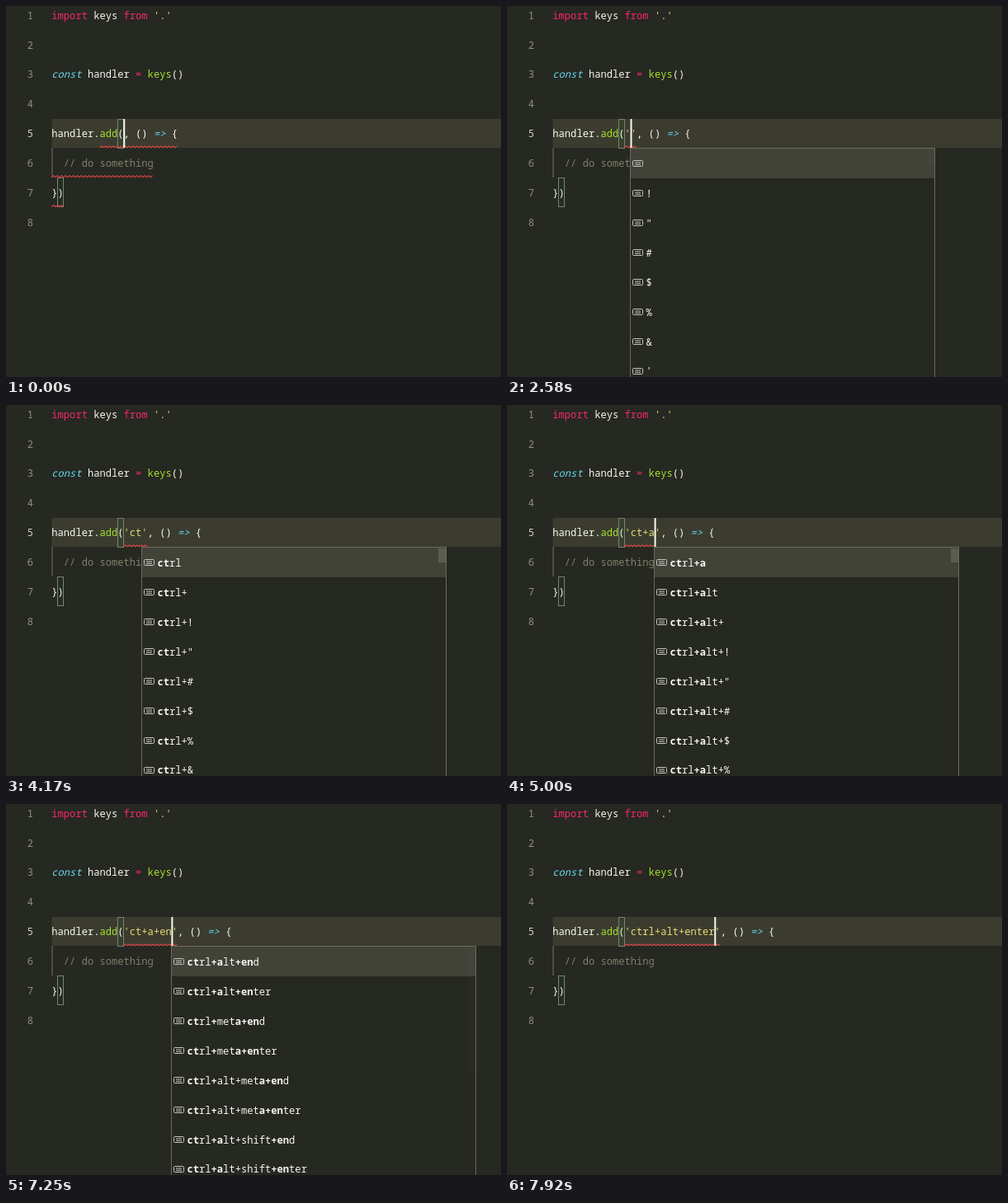
Recreate the animation shown at these times as an HTML page with a canvas. Size 600 px wide and 450 px high, loop 8000 ms.

```html
<!DOCTYPE html>
<html lang="en">
<head>
<meta charset="utf-8">
<title>Key completion</title>
<style>
html, body { margin: 0; width: 100%; height: 100%; overflow: hidden; background: #262822; }
canvas { display: block; }
</style>
</head>
<body>
<canvas id="stage" width="600" height="450"></canvas>
<script>
const ctx = document.getElementById('stage').getContext('2d');
const LOOP = 8000, CHAR = 7.27, LEFT = 55.3, ROW = 35.9;
const WHITE = '#f8f8f2', PINK = '#f92672', BLUE = '#66d9ef', GREEN = '#a6e22e',
  YELLOW = '#e6db74', COMMENT = '#827f6c', BORDER = '#6b6b5d';
const colX = col => LEFT + col * CHAR;
const baseline = line => 15.6 + (line - 1) * ROW;

// Text between the brackets of handler.add( )
const edits = [
  [0, ''], [1250, "''"], [2670, "'c'"], [3670, "'ct'"], [4500, "'ct+'"], [5000, "'ct+a'"],
  [5250, "'ct+a+'"], [5580, "'ct+a+e'"], [6000, "'ct+a+en'"], [7920, "'ctrl+alt+enter'"]
];
const caretToggles = [80, 580, 1080, 1250, 1830, 2250, 3170, 3670, 4170, 4500, 6500, 7080, 7500, 7920];
// Last column of the error underline below the string
const errorEnds = [
  [1670, 13], [1830, 14], [3080, 15], [4170, 16], [5000, 17], [5250, 18],
  [5580, 19], [6000, 20], [7080, 21], [7920, 28]
];

const symbols = ['', ...'!"#$%&\''];
const endings = (prefix, list) => list.map(s => prefix + s);
const withSymbols = prefix => endings(prefix, symbols);
// Odd groups of each match are the bold parts
const popups = [
  { time: 1500, col: 13, items: symbols, match: /^()(.*)$/ },
  { time: 2750, col: 14, items: ['c', 'ctrl', ...withSymbols('ctrl+')], match: /^(c)(.*)$/ },
  { time: 3750, col: 15, items: ['ctrl', ...withSymbols('ctrl+')], match: /^(ct)(.*)$/ },
  { time: 4500, col: 16, items: withSymbols('ctrl+'), match: /^(ct)(rl)(\+)(.*)$/ },
  { time: 5000, col: 17, items: ['ctrl+a', 'ctrl+alt', ...withSymbols('ctrl+alt+')], match: /^(ct)(rl)(\+a)(.*)$/ },
  { time: 5250, col: 18, items: withSymbols('ctrl+alt+'), match: /^(ct)(rl)(\+a)(lt)(\+)(.*)$/ },
  { time: 5580, col: 19,
    items: [...endings('ctrl+alt+', ['e', 'end', 'enter', 'esc', 'escape']), ...endings('ctrl+meta+', ['e', 'end', 'enter'])],
    match: /^(ct)(rl)(\+a(?!.*ta)|\+)(.*?)(a?\+e)(.*)$/ },
  { time: 6080, col: 20,
    items: ['alt+', 'meta+', 'alt+meta+', 'alt+shift+'].flatMap(p => endings('ctrl+' + p, ['end', 'enter'])),
    match: /^(ct)(rl)(\+a(?!.*ta)|\+)(.*?)(a?\+en)(.*)$/ }
];

const latest = (list, t) => list.filter(([time]) => time <= t).pop();

function rect(x, y, w, h, color) {
  ctx.fillStyle = color;
  ctx.fillRect(x, y, w, h);
}

// Places glyphs on the monospace grid and returns the next x
function write(text, x, y, color, style = '') {
  ctx.font = `${style} 12.1px "Noto Sans Mono", monospace`;
  ctx.fillStyle = color;
  for (const glyph of text) {
    ctx.fillText(glyph, x, y);
    x += CHAR;
  }
  return x;
}

function writeLine(line, col, ...runs) {
  let x = colX(col);
  for (const [text, color, style] of runs) x = write(text, x, baseline(line), color, style);
}

function squiggle(line, from, to) {
  const end = colX(to), y = 27.2 + (line - 1) * ROW;
  ctx.strokeStyle = '#e04444';
  ctx.lineWidth = 1.1;
  ctx.beginPath();
  for (let x = colX(from), i = 0; x <= end; x += 2.4, i++) ctx.lineTo(x, y + (i % 2 ? -0.9 : 0.9));
  ctx.stroke();
}

function bracketBox(line, col) {
  const x = Math.floor(colX(col)) + 0.5, y = Math.round((line - 1) * ROW - 7) + 0.5;
  rect(x, y, 7, 35, 'rgba(0,100,0,.1)');
  ctx.strokeStyle = '#7d7f78';
  ctx.lineWidth = 1;
  ctx.strokeRect(x, y, 7, 35);
}

function icon(x, y) {
  ctx.strokeStyle = '#c4c5bf';
  ctx.lineWidth = 1;
  ctx.beginPath();
  ctx.roundRect(x + 0.5, y - 3.5, 12, 7, 1);
  for (const lineY of [y - 1, y + 1.3]) {
    ctx.moveTo(x + 3, lineY);
    ctx.lineTo(x + 10, lineY);
  }
  ctx.stroke();
}

function drawPopup({ time, col, items, match }, t) {
  const x = Math.floor(colX(col)), top = 172.5, width = 370;
  const selected = t >= 7500 ? 1 : 0, shortList = time === 6080;
  rect(x, top, width, 300, '#262822');
  rect(x, top + 0.5 + selected * ROW, width, ROW, '#414339');

  items.slice(0, 8).forEach((item, i) => {
    const y = 191.2 + i * ROW;
    icon(x + 3, Math.round(y));
    let textX = x + 19.5;
    match.exec(item).slice(1).forEach((part, k) => {
      textX = write(part, textX, y + 4.9, WHITE, k % 2 ? '' : 'bold');
    });
  });

  let alpha = 0.26;
  if (time === 1500 && t >= 2580) alpha = 0.03;
  if (shortList && t >= 6830) alpha = t < 7500 ? 0.02 : 0;
  rect(x + width - 10, 174, 9, shortList ? 156 : 17, `rgba(160,165,155,${alpha})`);

  ctx.strokeStyle = BORDER;
  ctx.lineWidth = 1;
  ctx.strokeRect(x + 0.5, top, width - 1, 300);
}

function draw(t) {
  const value = latest(edits, t)[1];
  rect(0, 0, 600, 450, '#262822');
  rect(55.5, 137, 545, 35, '#3b3c2f');
  rect(55.5, 172, 1, 36, '#70726a');
  bracketBox(5, 11);
  bracketBox(7, 1);

  for (let n = 1; n <= 8; n++) write(String(n), 25.8, baseline(n), n === 5 ? '#d0d0ca' : '#90908a');
  writeLine(1, 0, ['import', PINK], [' keys ', WHITE], ['from', PINK], [" '.'", YELLOW]);
  writeLine(3, 0, ['const', BLUE, 'italic'], [' handler ', WHITE], ['=', PINK], [' keys', GREEN], ['()', WHITE]);
  writeLine(5, 0, ['handler.', WHITE], ['add', GREEN], ['(', WHITE], [value, YELLOW],
    [', () ', WHITE], ['=>', BLUE, 'italic'], [' {', WHITE]);
  writeLine(6, 2, ['// do something', COMMENT]);
  writeLine(7, 0, ['})', WHITE]);

  const errorEnd = latest(errorEnds, t);
  if (errorEnd) {
    squiggle(5, 12, errorEnd[1]);
  } else {
    squiggle(5, 8, 21 + value.length);
    squiggle(6, 0, 17);
    squiggle(7, 0, 2);
  }

  const popup = popups.filter(p => p.time <= t).pop();
  if (popup && t < 7920) drawPopup(popup, t);

  const caretOn = caretToggles.filter(time => time <= t).length % 2 === 0;
  if (caretOn) rect(colX(12 + Math.max(0, value.length - 1)) - 0.3, 137, 2, 35, WHITE);
}

const start = performance.now();
function tick() {
  draw((performance.now() - start) % LOOP);
  requestAnimationFrame(tick);
}
tick();
</script>
</body>
</html>
```
